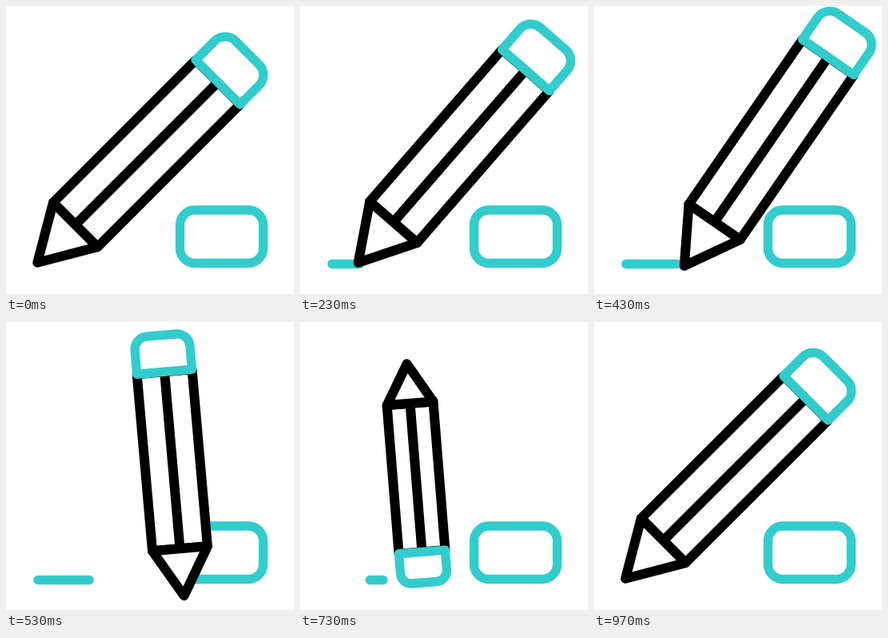
An HTML page for the animation above (1.67 s loop, 360 by 360 pixels).

```html
<!DOCTYPE html>
<html lang="en">
<head>
<meta charset="utf-8">
<title>Pencil</title>
<style>
  html, body { margin: 0; height: 100%; overflow: hidden; background: #fff; }
  svg { display: block; width: 100%; height: 100%; }
  path, rect { stroke-width: 12; stroke-linecap: round; stroke-linejoin: round;
    vector-effect: non-scaling-stroke; fill: #fff; stroke: #000; }
  .teal { stroke: #3cc; stroke-width: 11.4; }
</style>
</head>
<body>
<svg viewBox="0 0 360 360">
  <rect class="teal" x="217.5" y="255" width="104" height="66.5" rx="18.5"/>
  <path id="line" class="teal"/>
  <g id="pencil">
    <path d="M-132-39.25H120V39.25H-132Z"/>
    <path d="M-132 0H120"/>
    <path d="M-132-39.25L-199 0L-132 39.25Z"/>
    <path class="teal" d="M120-39.25H153.6a18.4 18.4 0 0 1 18.4 18.4V20.85a18.4 18.4 0 0 1-18.4 18.4H120Z"/>
  </g>
</svg>
<script>
const LOOP = 1670, DRAWN = 12, HOME = 29, TIP = 199;
const line = document.getElementById('line');
const pencil = document.getElementById('pencil');

const clamp = v => Math.min(1, Math.max(0, v));
const progress = (t, from, to) => clamp((t - from) / (to - from));
const smooth = u => u * u * (3 - 2 * u);
const stroke = t => progress(t, 0, DRAWN) ** 1.3;

// Pose [x, y, degrees] while the tip slides along the line
function drawPose(t) {
  const p = stroke(t), deg = 45 + 8 * p, a = deg * Math.PI / 180;
  return [39.3 + 67.5 * p + TIP * Math.cos(a), 320.8 - TIP * Math.sin(a), deg];
}

// Key poses of the full turn: lift, wipe, swing back, rest
const turn = [
  [DRAWN, ...drawPose(DRAWN)],
  [16, 207.3, 167.5, 95],
  [22, 145.4, 199, 274.6],
  [25, 188.5, 184.2, 367.7],
  [HOME, 180, 180, 405]
];

// Smooth curve through the key poses, at rest at both ends
function turnPose(t) {
  const i = turn.findIndex(k => k[0] >= t) - 1;
  const from = turn[i], to = turn[i + 1], h = to[0] - from[0];
  const u = (t - from[0]) / h, w = 1 - u;
  const speed = (n, c) => n > 0 && n < turn.length - 1
    ? (turn[n + 1][c] - turn[n - 1][c]) / (turn[n + 1][0] - turn[n - 1][0]) : 0;
  return [1, 2, 3].map(c => from[c] + (to[c] - from[c]) * smooth(u)
    + h * u * w * (speed(i, c) * w - speed(i + 1, c) * u));
}

function draw(now) {
  // 30 steps per second, on a 10 ms clock
  const tick = Math.floor((now % LOOP) / 10);
  const t = Math.min(HOME, Math.floor(tick * .3 + .15));

  const start = 40 + 64 * smooth(progress(t, 20, 23));
  const end = Math.min(104, 40 + 70 * stroke(t));
  line.setAttribute('d', end > start ? `M${start} 322.5H${end}` : '');

  const [x, y, deg] = t <= DRAWN ? drawPose(t) : turnPose(t);
  const size = 1 - .284 * Math.sin(Math.PI * progress(t, DRAWN, HOME)) ** 2.2;
  pencil.setAttribute('transform', `translate(${x} ${y}) rotate(${-deg}) scale(${size})`);
  requestAnimationFrame(draw);
}
draw(0);
</script>
</body>
</html>
```
